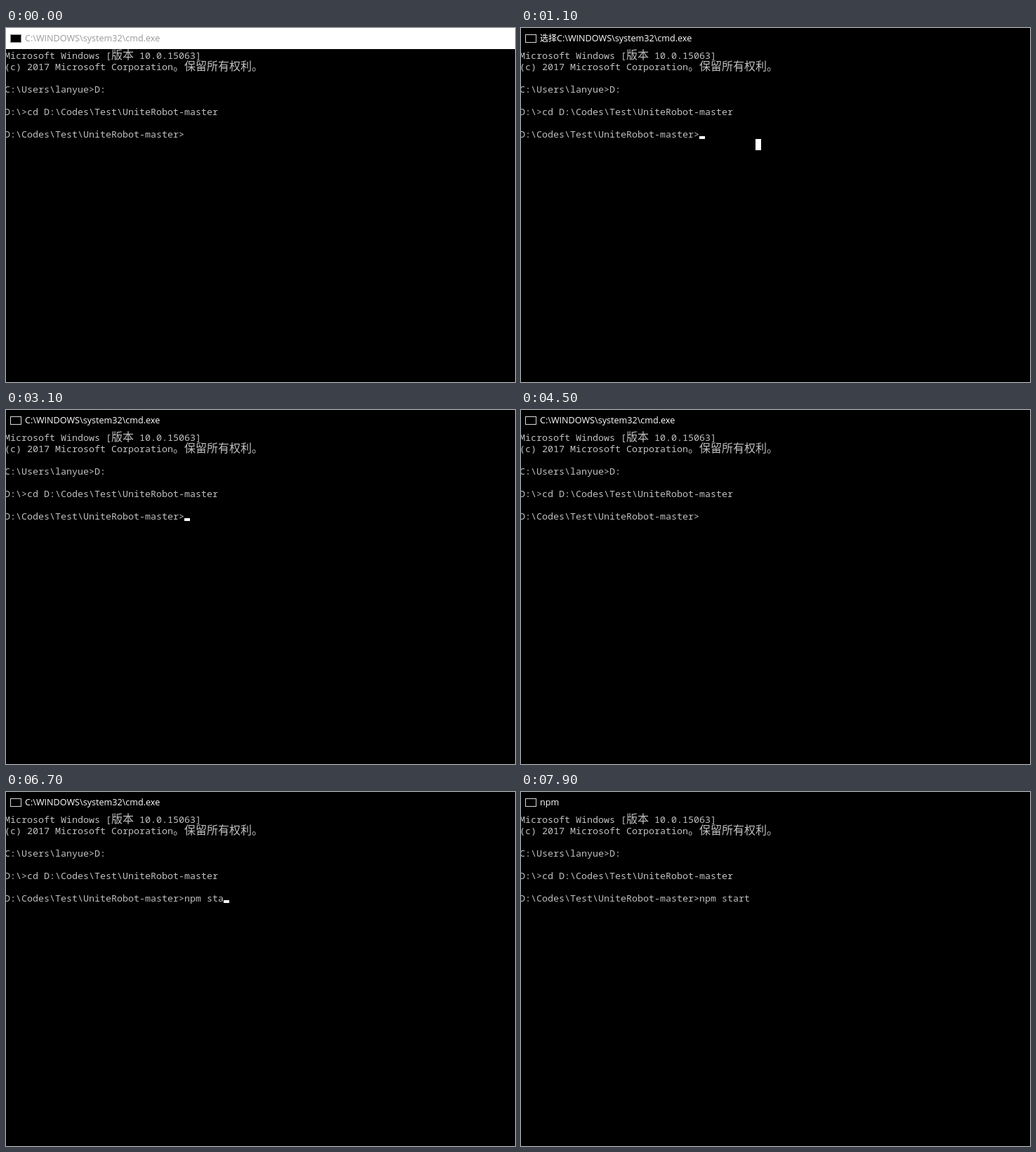
Write an HTML page that moves like this. It is 725 px wide and 504 px high and loops after 8000 ms.

```html
<!DOCTYPE html>
<html lang="zh-CN">
<head>
<meta charset="utf-8">
<title>Console</title>
<style>
html, body { margin: 0; width: 100%; height: 100%; overflow: hidden; background: #000; }
svg { display: block; width: 725px; height: 504px; }
text { white-space: pre; }
.term { font: 300 13.333px "Noto Sans Mono", "Liberation Mono", monospace; fill: #c0c0c0; }
.term .cjk { font: 300 16px "Noto Sans CJK SC", "Noto Sans CJK", sans-serif; }
#title { font: 12.6px "Open Sans", sans-serif; }
#title .cjk { font: 12px "Noto Sans CJK SC", "Noto Sans CJK", sans-serif; }
</style>
</head>
<body>
<svg viewBox="0 0 725 504">
  <rect width="725" height="504"/>
  <rect id="bar" width="725" height="30"/>
  <rect id="icon" x="6.5" y="9.5" width="15" height="11" fill="#000"/>
  <text id="title" x="27" y="19"><tspan class="cjk" id="mark"></tspan><tspan id="name"></tspan></text>
  <g class="term">
    <text x="-2" y="44">Microsoft Windows [<tspan class="cjk">版本</tspan> 10.0.15063]</text>
    <text x="-2" y="60">(c) 2017 Microsoft Corporation<tspan class="cjk">。保留所有权利。</tspan></text>
    <text x="-2" y="92">C:\Users\lanyue&gt;D:</text>
    <text x="-2" y="124">D:\&gt;cd D:\Codes\Test\UniteRobot-master</text>
    <text x="-2" y="156">D:\Codes\Test\UniteRobot-master&gt;<tspan id="typed"></tspan></text>
  </g>
  <rect id="cursor" width="8" height="4" fill="#fff"/>
  <rect id="block" x="334" y="158" width="8" height="16" fill="#fff"/>
</svg>
<script>
const LOOP = 8000, COMMAND = "npm start", SHELL = "C:\\WINDOWS\\system32\\cmd.exe";
const FOCUS = 600, SELECT = [1100, 3100], ENTER = 7600;
const keys = [5300, 5600, 5700, 6100, 6300, 6500, 6700, 7100, 7300];
const hidden = [[0, 1100], [1600, 2100], [2600, 3100], [3600, 4000], [4500, 5000],
  [5500, 5600], [6000, 6100], [7000, 7100], [7400, 7600], [7800, 8000]];

const el = id => document.getElementById(id);
const set = (id, name, value) => el(id).setAttribute(name, value);
const write = (id, s) => { if (el(id).textContent !== s) el(id).textContent = s; };
const within = (t, [a, b]) => t >= a && t < b;
const show = (id, on) => set(id, "visibility", on ? "visible" : "hidden");

function windowName(t) {
  if (t >= 7900) return "npm";
  return t >= 7700 ? SHELL + " - npm  start" : SHELL;
}

function draw(t) {
  const active = t >= FOCUS, selecting = within(t, SELECT);
  set("bar", "fill", active ? "#000" : "#fff");
  set("title", "fill", active ? "#fff" : "#999");
  set("icon", "stroke", active ? "#d8d8d8" : "#8a8a8a");
  write("mark", selecting ? "选择" : "");
  write("name", windowName(t));

  const count = keys.filter(k => t >= k).length;
  write("typed", COMMAND.slice(0, count));
  const entered = t >= ENTER;
  set("cursor", "x", entered ? -2 : 254 + 8 * count);
  set("cursor", "y", entered ? 170 : 154);
  show("cursor", !hidden.some(span => within(t, span)));
  show("block", selecting);
}

const start = performance.now();
function tick() {
  draw((performance.now() - start) % LOOP);
  requestAnimationFrame(tick);
}
draw(0);
requestAnimationFrame(tick);
</script>
</body>
</html>
```
